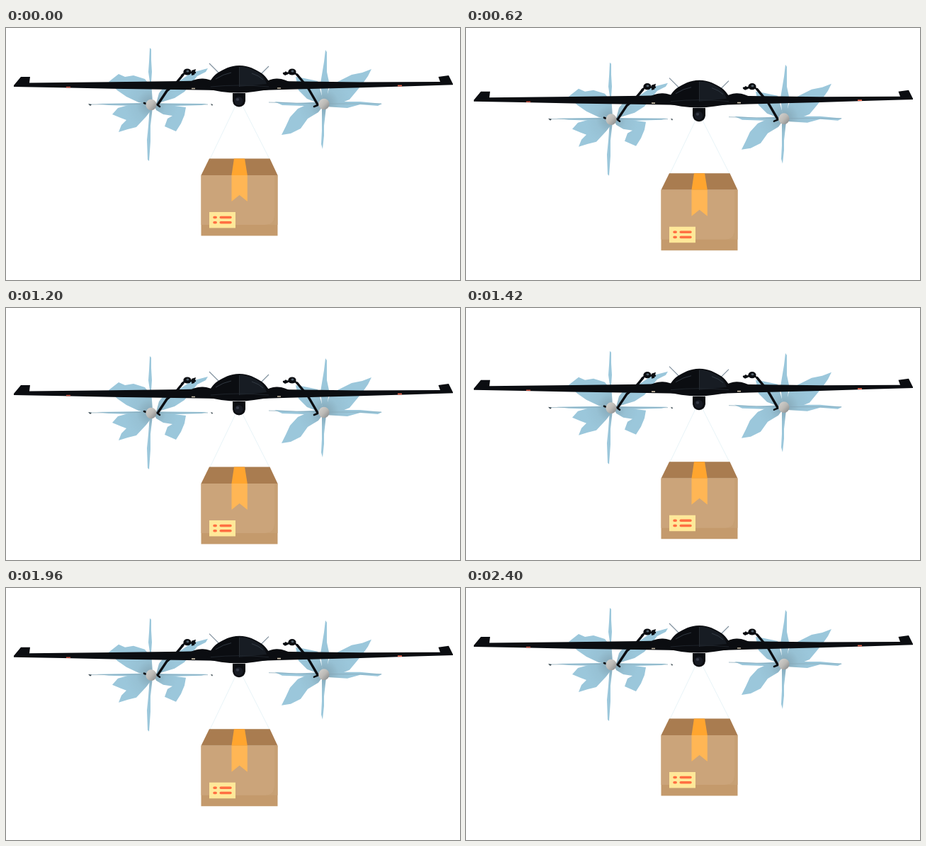
These frames come from a looping animation (641 by 356 pixels, 2420 ms). An HTML page with a canvas:

```html
<!DOCTYPE html>
<html lang="en">
<head>
<meta charset="utf-8">
<title>Delivery drone</title>
<style>
html, body { margin: 0; width: 100%; height: 100%; overflow: hidden; background: #fff; }
canvas { display: block; }
</style>
</head>
<body>
<canvas id="stage" width="641" height="356"></canvas>
<script>
const ctx = document.getElementById('stage').getContext('2d');
const LOOP = 2420, STEP = 20, TURN = 1200, DROP = 40;
const BLUE = '#9bc7db', BLACK = '#0b0d11';

function fill(d, color) {
  ctx.fillStyle = color;
  ctx.fill(new Path2D(d));
}

function stroke(d, color, width, cap = 'butt') {
  ctx.strokeStyle = color;
  ctx.lineWidth = width;
  ctx.lineCap = cap;
  ctx.stroke(new Path2D(d));
}

function disc(x, y, rx, ry, color) {
  ctx.fillStyle = color;
  ctx.beginPath();
  ctx.ellipse(x, y, rx, ry, 0, 0, Math.PI * 2);
  ctx.fill();
}

function blend(g, ...colors) {
  colors.forEach((c, i) => g.addColorStop(i / (colors.length - 1), c));
  return g;
}

// Blades darken towards the hub.
function blades(x, y, ...paths) {
  const shade = blend(ctx.createRadialGradient(x, y, 4, x, y, 38), '#86a9b9', '#97c1d4', BLUE);
  for (const d of paths) fill(d, shade);
}

function rotors() {
  blades(205, 108,
    'M203 28L205 30L205 45L206 62L205 76L207 104H203L203 76L201 62L202 48Z',
    'M203 112H207L204 138L204 160L202 188L200 186L199 158L201 138Z',
    'M159 65L168 69L180 67L196 72L204 82V108L187 105L170 97L157 88L145 76Z',
    'M150 122L158 113L180 107L204 104L208 112L198 125L184 140L172 143L159 147L163 137L170 130L162 127Z',
    'M224 82L246 74L262 63L285 57L282 62L270 68L261 79L252 90L238 99L212 107L216 92Z',
    'M208 106L230 109L254 112L252 123L247 135L240 146L224 139L228 128L235 124L222 122L212 116Z',
    'M128 107L190 106L284 107L276 109L210 111L145 109Z');
  blades(449, 107,
    'M451 31L453 34L453 62L456 76L453 105H447L444 78L449 48Z',
    'M446 112H452L449 138L449 152L447 171L445 164L446 145Z',
    'M468 76L488 66L503 63L516 58L511 68L504 78L495 89L485 101L470 107H450L456 86Z',
    'M409 69L421 71L440 75L449 106L438 105L425 100L413 88Z',
    'M389 151L395 139L401 126L412 114L430 106L450 107L441 119L426 128L416 142L402 149Z',
    'M379 104L410 106L450 104L500 104L531 107L525 110L500 108L482 113L450 111L390 109Z');
  stroke('M117 108L190 107.5M212 108L285 108M371 105L440 107M456 107L530 107', '#86a7b6', .7);
  fill('M116 107L121 108L119 110ZM289 107L292 108L291 110Z', '#33424a');
}

function arms() {
  stroke('M250 66L240 78L227 89L215 107M411 66L426 84L440 108', BLACK, 3.4, 'round');
  stroke('M195 106L203 109M213 108L217 111M435 111L440 109', BLACK, 2.6, 'round');
  stroke('M248 67L253 63L267 63M392 64L407 63L412 67', BLACK, 2.4, 'round');
  for (const x of [256, 404]) {
    disc(x, 62, 5.6, 4.6, BLACK);
    disc(x + .5, 61, 2, 1.5, '#53606a');
  }
  fill('M262 60L268 58L266 66L262 67ZM391 65L395 61L399 65L394 67Z', BLACK);
}

function hubs() {
  for (const [x, y] of [[205, 108.5], [449, 107.5]]) {
    const shade = ctx.createLinearGradient(x - 7, y - 6, x + 7, y + 7);
    disc(x, y, 7.6, 7.8, blend(shade, '#d2d1ce', '#bbb9b5', '#85888a'));
  }
}

function airframe() {
  stroke('M287 50L302 65M371 54L359 66', '#82929f', 1.2);
  fill('M257 78Q266 71 278 71.5Q288 72 296 77L290 84H258Z', BLACK);
  fill('M364 78Q373 71 383 71.5Q395 72 402 78L400 84H368Z', BLACK);
  // wings and winglets
  fill('M11 81L21 69L34 69L33 77.5L150 76.3L250 75L290 74L300 88L255 87.3L150 85.8L80 84.3L11 83Z', BLACK);
  fill('M631 79L625 67L610.5 69L613 76L500 76.5L400 75.3L368 74L360 88L400 86.8L500 84.3L570 82.2L631 80.3Z', BLACK);
  // fuselage
  fill('M282 86C287 77 291 69 298 64C308 58 316 53 329.5 53C343 53 351 58 361 64C368 69 372 77 378 86L364 88L350 90Q329 93 304 90Z', BLACK);
  fill('M330 54.5C342 55 350 59 359 65Q365 70 368 79L330 83Z', '#171c23');
  stroke('M296 72Q307 65 318 63M347 64Q357 67 363 73', '#353d47', .9);
  stroke('M329.5 55V83', '#2e343c', .8);
  stroke('M289 83Q329 79 371 83', '#242a32', .8);
  // camera
  fill('M320 92H338V103Q337 111 329 111.5Q321 111 320 103Z', BLACK);
  disc(328.5, 103, 6, 6, '#171a22');
  disc(327, 101, 2.2, 2, '#343844');
  // lights
  stroke('M85 83.6H91', '#c9503f', 1.5);
  stroke('M553 81.5H559', '#ed684f', 1.8);
  stroke('M262 85.5H267M383 85H388', '#c8bca6', 1.6);
}

function parcel() {
  stroke('M324 110L288 185M334 110L372 185', '#e8f4f8', 1);
  fill('M287 184.5H372.5L383.5 208H275.5Z', '#a97c50');
  fill('M275.5 208H383.5V293.5H275.5Z', '#c49a6c');
  fill('M275.5 208H379V265Q379 278 366 278H275.5Z', '#cba47a');
  fill('M379 208H383.5V278H366Q379 278 379 265Z', '#c7a074');
  fill('M322 184.5H337L340.8 208H318.5Z', '#ffa52f');
  fill('M318.5 208H340.8V245L329.6 236L318.5 245Z', '#ffb655');
  fill('M287 260H324V282.5H287Z', '#ffe899');
  stroke('M294 267.5H296.2M303.2 267.5H317M294 274.8H296.2M303.2 274.8H317', '#ff6f42', 3.5, 'round');
}

function render(now) {
  const t = Math.floor((now % LOOP) / STEP) * STEP;
  const y = DROP * (1 - Math.abs(t - TURN) / TURN);
  ctx.setTransform(1, 0, 0, 1, 0, 0);
  ctx.fillStyle = '#fff';
  ctx.fillRect(0, 0, 641, 356);
  ctx.translate(0, y);
  rotors();
  arms();
  airframe();
  hubs();
  parcel();
}

let start;
function tick(now) {
  start ??= now;
  render(now - start);
  requestAnimationFrame(tick);
}
render(0);
requestAnimationFrame(tick);
</script>
</body>
</html>
```
